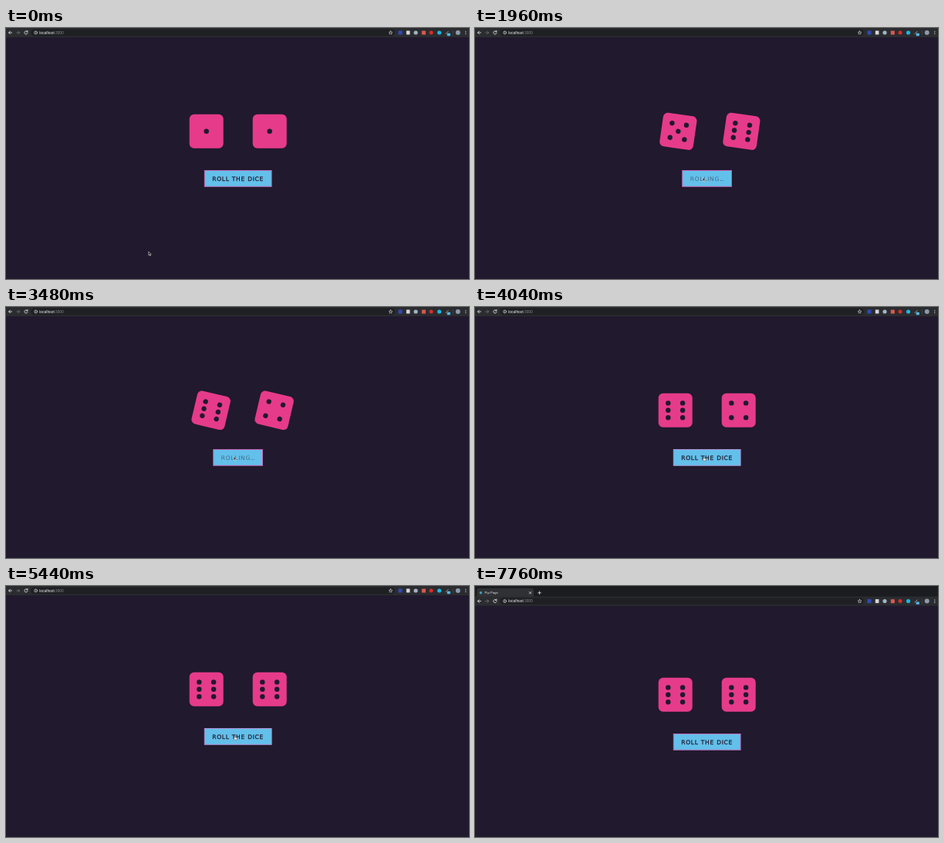
An HTML page for the animation above (7840 ms loop, 600 by 325 pixels).

```html
<!DOCTYPE html>
<html lang="en">
<head>
<meta charset="utf-8">
<title>Pip Page</title>
<style>
  html, body { margin: 0; width: 100%; height: 100%; overflow: hidden; background: #21192d; }
  svg { display: block; width: 600px; height: 325px; }
  text { font-family: Roboto, Arial, sans-serif; }
  .label { font: 7.5px "DejaVu Sans", sans-serif; letter-spacing: .75px; fill: #21192d; }
  .line { fill: none; stroke: #e8eaed; stroke-width: .8; stroke-linecap: round; stroke-linejoin: round; }
</style>
</head>
<body>
<svg viewBox="0 0 600 325">
  <rect width="600" height="325" fill="#21192d"/>

  <g id="page">
    <g id="dice" fill="#21192d"></g>
    <g id="idle">
      <rect id="edge" x="257.3" y="184.5" width="86.8" height="20.8" fill="#63c0ea" stroke="#b868b4"/>
      <text class="label" x="267.2" y="197.6" stroke="#21192d" stroke-width=".25">ROLL THE DICE</text>
    </g>
    <g id="busy">
      <rect x="268.7" y="184.5" width="63.8" height="20.8" fill="#63c0ea" stroke="#c05fae"/>
      <text class="label" x="278.7" y="197.6" opacity=".5">ROLLING<tspan letter-spacing="-.9">...</tspan></text>
    </g>
  </g>

  <g id="chrome">
    <g id="tabs">
      <rect y="-14" width="600" height="15" fill="#1b1c1f"/>
      <path d="M1 .5Q2.5 .5 2.5 -2V-8.5Q2.5 -10.5 4.5 -10.5H74Q76 -10.5 76 -8.5V-2Q76 .5 77.5 .5Z" fill="#303135"/>
      <circle cx="7.5" cy="-4.8" r="1.7" fill="#3f9fc4"/>
      <text x="12.6" y="-3.2" font-size="4.4" fill="#dfe1e5">Pip Page</text>
      <path class="line" stroke-width=".6" d="M70.4 -6l2.4 2.4m0 -2.4l-2.4 2.4M81.8 -4.8h3.6m-1.8 -1.8v3.6"/>
    </g>
    <rect width="600" height="12" fill="#2b2c30"/>
    <rect x="32" y="1.6" width="472" height="8.8" rx="4.4" fill="#1f2023"/>
    <path class="line" d="M7.6 6H3.6m1.9 -1.9l-1.9 1.9l1.9 1.9"/>
    <path class="line" opacity=".35" d="M13.6 6h4m-1.9 -1.9l1.9 1.9l-1.9 1.9"/>
    <path class="line" d="M27.7 4.7a2.1 2.1 0 1 0 .4 1.6M28 3.4v1.5h-1.5"/>
    <circle class="line" cx="38.6" cy="6" r="2" style="stroke-width:.6"/>
    <path class="line" style="stroke-width:.6" d="M38.6 5.9v1M38.6 4.9v.05"/>
    <text x="43.2" y="7.6" font-size="4.8" fill="#eef0f2">localhost<tspan fill="#85888d">:3000</tspan></text>
    <path class="line" style="stroke-width:.55" d="M498.5 3.7l.7 1.6 1.7.1-1.3 1.1.4 1.7-1.5-.9-1.5.9.4-1.7-1.3-1.1 1.7-.1z"/>
    <rect x="508.5" y="3.5" width="5" height="5" fill="#3049b8"/>
    <rect x="518.8" y="3.5" width="4.6" height="5" fill="#d7d7d9"/>
    <circle cx="531" cy="6" r="2.6" fill="#a3b3c6"/>
    <rect x="538.8" y="3.6" width="5" height="5" fill="#d85a50"/>
    <circle cx="551" cy="6" r="2.5" fill="#d92d2b"/>
    <circle cx="561.5" cy="6" r="2.6" fill="#21b4df"/>
    <path class="line" stroke-opacity=".75" d="M570 7.5l3 -3"/>
    <rect x="571.6" y="6.8" width="4.2" height="3.4" rx=".6" fill="#55b8e8"/>
    <path d="M579.2 3v6" stroke="#55575c" stroke-width=".5"/>
    <circle cx="585.7" cy="6" r="3" fill="#8c98ac"/>
    <g fill="#e8eaed"><circle cx="595.8" cy="4.2" r=".55"/><circle cx="595.8" cy="6" r=".55"/><circle cx="595.8" cy="7.8" r=".55"/></g>
  </g>

  <g id="cursor" stroke-linejoin="round">
    <path id="arrow" d="M0 0V4.7L1.1 3.7 1.9 5.4 2.7 5 1.9 3.4H3.4Z" fill="#111" stroke="#f4f4f4" stroke-width=".55"/>
    <path id="hand" d="M.7 .3Q1.2 -.3 1.6 .4V2.2L4 2.8Q4.6 3 4.4 3.8L3.9 5.6H1.4L-.4 3.5Q-.3 2.8 .7 3.3Z" fill="#eee" stroke="#222" stroke-width=".4"/>
  </g>
</svg>

<script>
const LOOP = 7840, ROLL = 1000, SWING = 500, TILT = 23, SHIFT = 10.3;
const rolls = [
  { at: 1489, faces: [5, 6] },
  { at: 2681, faces: [6, 4] },
  { at: 4430, faces: [6, 6] }
];
const pips = {
  1: [[0, 0]],
  4: [[-1, -1], [1, -1], [-1, 1], [1, 1]]
};
pips[5] = [...pips[4], ...pips[1]];
pips[6] = [...pips[4], [-1, 0], [1, 0]];

const el = id => document.getElementById(id);
const [page, dice, idle, busy, edge, chrome, tabs, cursor, arrow, hand] =
  ['page', 'dice', 'idle', 'busy', 'edge', 'chrome', 'tabs', 'cursor', 'arrow', 'hand'].map(el);
const show = (node, on) => node.setAttribute('visibility', on ? 'visible' : 'hidden');
const move = (node, x, y, turn = 0) =>
  node.setAttribute('transform', `translate(${x} ${y}) rotate(${turn})`);
const ease = (t, from, to) => {
  const p = Math.min(1, Math.max(0, (t - from) / (to - from)));
  return p * p * (3 - 2 * p);
};

function dieMarkup(face) {
  const dots = pips[face].map(([x, y]) => `<circle cx="${x * 9.4}" cy="${y * 9.4}" r="3.2"/>`);
  return `<g><rect x="-22" y="-22" width="44" height="44" rx="6" fill="#e53b8a"/>${dots.join('')}</g>`;
}

let shown = '';
function setFaces(faces) {
  if (shown === faces.join()) return;
  shown = faces.join();
  dice.innerHTML = faces.map(dieMarkup).join('');
}

function draw(t) {
  const roll = rolls.filter(r => t >= r.at).pop();
  const age = roll ? t - roll.at : ROLL;
  const rolling = age < ROLL;
  const swing = rolling ? -Math.sin(age / SWING * 2 * Math.PI) : 0;

  setFaces(roll ? roll.faces : [1, 1]);
  [...dice.children].forEach((die, i) =>
    move(die, 259.7 + 82 * i + swing * SHIFT, 133.8, swing * TILT));
  show(idle, !rolling);
  show(busy, rolling);

  const come = ease(t, 0, 860), leave = ease(t, 6420, 6720);
  const x = 184.8 + 110.4 * come + 30 * leave;
  const y = 289.6 - 96 * come - 202 * leave;
  const over = !rolling && x > 257 && x < 344 && y > 184 && y < 205;
  move(cursor, x, y);
  show(arrow, !over);
  show(hand, over);
  edge.setAttribute('stroke', over ? '#a98fd0' : '#b868b4');

  const reveal = ease(t, 6840, 7560);
  move(chrome, 0, 13.6 * reveal);
  show(tabs, reveal > 0);
  move(page, 0, 7 * reveal);
}

const start = performance.now();
function tick() {
  const t = (performance.now() - start) % LOOP;
  draw(Math.floor(t / 40) * 40);
  requestAnimationFrame(tick);
}
draw(0);
requestAnimationFrame(tick);
</script>
</body>
</html>
```
